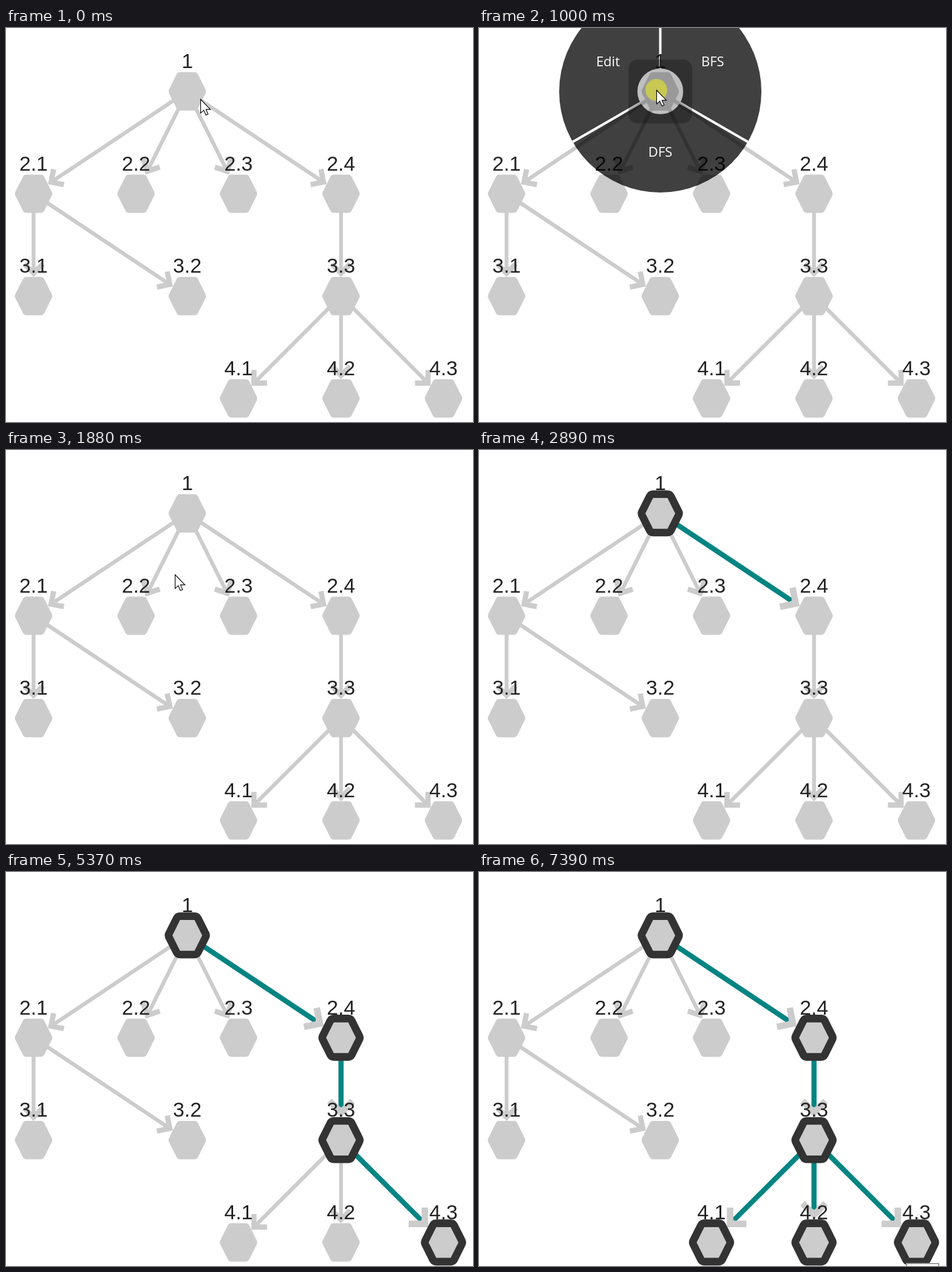
Write an HTML page with a canvas that moves like this. It is 769 px wide and 649 px high and loops after 8 s.

```html
<!DOCTYPE html>
<html lang="en">
<head>
<meta charset="utf-8">
<title>Tree traversal</title>
<style>
html, body { margin: 0; width: 100%; height: 100%; overflow: hidden; background: #fff; }
canvas { display: block; }
</style>
</head>
<body>
<canvas id="stage" width="769" height="649"></canvas>
<script>
const W = 769, H = 649, LOOP = 8000;
const ctx = document.getElementById('stage').getContext('2d');
const layer = Object.assign(document.createElement('canvas'), { width: W, height: H });
const menuCtx = layer.getContext('2d');

const STEP = 168.75, ZOOM = 2.107;
const HALF = 15 * ZOOM, BORDER = 6 * ZOOM;
const MENU_R = 166.5, ACTIVE_R = 193.5, SPOT_R = 37.7;
const RAD = Math.PI / 180;

// label: [column, row]
const grid = {
  '1': [1.5, 0],
  '2.1': [0, 1], '2.2': [1, 1], '2.3': [2, 1], '2.4': [3, 1],
  '3.1': [0, 2], '3.2': [1.5, 2], '3.3': [3, 2],
  '4.1': [2, 3], '4.2': [3, 3], '4.3': [4, 3]
};
const nodes = {};
for (const [id, [col, row]] of Object.entries(grid)) {
  nodes[id] = { x: 45.4 + col * STEP, y: 104.4 + row * 168.6 };
}
const edges = [
  ['1', '2.1'], ['1', '2.2'], ['1', '2.3'], ['1', '2.4'],
  ['2.1', '3.1'], ['2.1', '3.2'], ['2.4', '3.3'],
  ['3.3', '4.1'], ['3.3', '4.2'], ['3.3', '4.3']
];

// Depth-first visit: when each node and the edge into it light up.
const nodeTime = { '1': 2380, '2.4': 3380, '3.3': 4360, '4.3': 5370, '4.2': 6370, '4.1': 7390 };
const edgeTime = { '2.4': 2890, '3.3': 3860, '4.3': 4870, '4.2': 5870, '4.1': 6890 };

// time, x, y; the pointer holds each place until the next
const pointer = [
  [0, 320, 117], [120, 316, 114], [250, 306, 108], [380, 297, 104], [510, 292, 102],
  [1380, 289, 118], [1500, 284, 154], [1630, 279, 194], [1750, 278, 205],
  [2130, 350, 190], [2250, 598, 130]
];
const PRESS = 510, MENU = 1000, RELEASE = 1880, LEAVE = 2380, TIP = 6490;
const root = nodes['1'];

const reached = (table, id, t) => t >= (table[id] ?? Infinity);

function polygon(c, points) {
  c.beginPath();
  points.forEach(([x, y]) => c.lineTo(x, y));
  c.closePath();
}

function hexagon(x, y) {
  const corners = [[1, 0], [.5, 1], [-.5, 1], [-1, 0], [-.5, -1], [.5, -1]]
    .map(([a, b]) => [x + a * HALF, y + b * HALF]);
  ctx.beginPath();
  ctx.moveTo(x, y - HALF);
  for (let i = 0; i < 6; i++) {
    const p = corners[(i + 5) % 6], q = corners[(i + 6) % 6];
    ctx.arcTo(...p, ...q, 3 * ZOOM);
  }
  ctx.closePath();
}

function drawEdge(from, to, t) {
  const a = nodes[from], b = nodes[to];
  const lit = reached(edgeTime, to, t);
  const width = lit ? 4 : 3;
  const angle = Math.atan2(b.y - a.y, b.x - a.x);
  const ux = Math.abs(Math.cos(angle)), uy = Math.abs(Math.sin(angle));
  const h = HALF + (reached(nodeTime, to, t) ? BORDER / 2 : 0);
  const inset = Math.min(h / uy, 2 * h / (2 * ux + uy));
  const length = Math.hypot(b.x - a.x, b.y - a.y) - inset;
  const size = Math.max((width * 13.37) ** .9, 29) * 2 * ZOOM;

  ctx.save();
  ctx.translate(a.x, a.y);
  ctx.rotate(angle);
  ctx.fillStyle = lit ? '#028482' : '#ccc';
  ctx.fillRect(0, -width * ZOOM / 2, length - 1.9 * width * ZOOM, width * ZOOM);
  ctx.translate(length, 0);
  ctx.fillStyle = '#ccc';
  polygon(ctx, [[0, 0], [-.15, .15], [-.2, .1], [-.1, 0], [-.2, -.1], [-.15, -.15]]
    .map(([x, y]) => [x * size, y * size]));
  ctx.fill();
  ctx.restore();
}

function drawNode(id, t) {
  const { x, y } = nodes[id];
  hexagon(x, y);
  ctx.fillStyle = '#ccc';
  ctx.fill();
  if (reached(nodeTime, id, t)) {
    ctx.strokeStyle = '#333';
    ctx.lineWidth = BORDER;
    ctx.stroke();
  }
  ctx.fillStyle = '#222';
  ctx.font = '33.7px "Liberation Sans", Arial, sans-serif';
  ctx.textAlign = 'center';
  ctx.fillText(id, x, y - 38.5);
}

function drawMenu(px, py) {
  const c = menuCtx;
  const dx = px - root.x, dy = py - root.y;
  c.clearRect(0, 0, W, H);
  c.save();
  c.translate(root.x, root.y);

  c.fillStyle = 'rgba(0,0,0,.75)';
  c.beginPath();
  c.arc(0, 0, MENU_R, 0, 7);
  c.fill();

  c.globalCompositeOperation = 'destination-out';
  c.lineWidth = 4;
  c.strokeStyle = '#000';
  for (const deg of [-90, 30, 150]) {
    c.beginPath();
    c.moveTo(0, 0);
    c.lineTo(MENU_R * 1.02 * Math.cos(deg * RAD), MENU_R * 1.02 * Math.sin(deg * RAD));
    c.stroke();
  }
  c.globalCompositeOperation = 'source-over';

  const active = Math.hypot(dx, dy) > SPOT_R;
  if (active) {
    c.fillStyle = 'rgba(1,105,217,.75)';
    c.beginPath();
    c.moveTo(0, 0);
    c.arc(0, 0, ACTIVE_R, 30 * RAD, 150 * RAD);
    c.fill();
  }

  c.globalCompositeOperation = 'destination-out';
  c.fillStyle = '#000';
  c.beginPath();
  c.arc(0, 0, SPOT_R, 0, 7);
  c.fill();
  if (active) {
    c.rotate(Math.atan2(dy, dx));
    c.translate(16.7, 0);
    c.rotate(45 * RAD);
    c.fillRect(-26, -26, 52, 52);
  }
  c.restore();
  ctx.drawImage(layer, 0, 0);

  ctx.fillStyle = '#fff';
  ctx.font = '22px "Open Sans", "Noto Sans", sans-serif';
  ctx.textAlign = 'center';
  ctx.fillText('Edit', 212.4, 63);
  ctx.fillText('BFS', 384.8, 63);
  ctx.fillText('DFS', 298.6, 212);
}

function drawPointer(x, y, pressed) {
  if (pressed) {
    ctx.fillStyle = 'rgba(255,255,0,.46)';
    ctx.beginPath();
    ctx.arc(x, y, 18, 0, 7);
    ctx.fill();
  }
  ctx.save();
  ctx.translate(x + .5, y + .5);
  ctx.scale(1.4, 1.4);
  polygon(ctx, [[0, 0], [0, 16.2], [3.7, 12.8], [6.2, 18.6], [8.8, 17.5], [6.3, 11.9], [11.5, 11.9]]);
  ctx.fillStyle = '#fff';
  ctx.fill();
  ctx.strokeStyle = '#000';
  ctx.lineWidth = .8;
  ctx.stroke();
  ctx.restore();
}

function draw(t) {
  ctx.fillStyle = '#fff';
  ctx.fillRect(0, 0, W, H);
  edges.forEach(([from, to]) => drawEdge(from, to, t));
  Object.keys(nodes).forEach(id => drawNode(id, t));

  const pressed = t >= PRESS && t < RELEASE;
  const [, px, py] = pointer.findLast(p => t >= p[0]);
  if (pressed) {
    ctx.fillStyle = 'rgba(0,0,0,.25)';
    ctx.beginPath();
    ctx.roundRect(root.x - 52.5, root.y - 52.5, 105, 105, 15);
    ctx.fill();
    if (t >= MENU) drawMenu(px, py);
  }
  if (t < LEAVE) drawPointer(px, py, pressed);

  if (t >= TIP) {
    ctx.fillStyle = '#fff';
    ctx.fillRect(703, 644, 55, 5);
    ctx.strokeStyle = '#a0a0a0';
    ctx.lineWidth = 2;
    ctx.strokeRect(704, 645, 53, 20);
  }
}

const start = performance.now();
function tick() {
  draw((performance.now() - start) % LOOP);
  requestAnimationFrame(tick);
}
tick();
</script>
</body>
</html>
```
